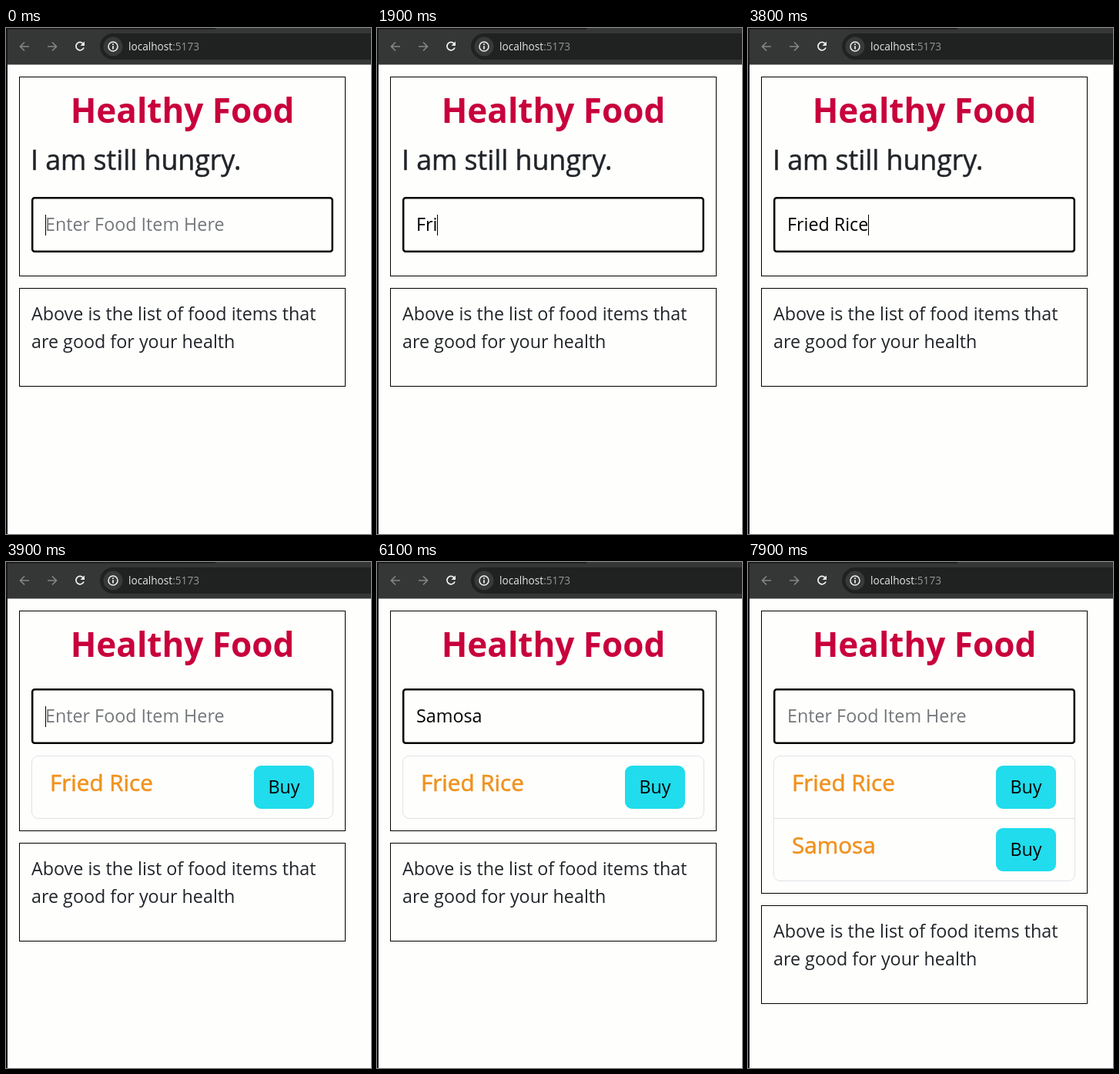
Recreate the animation shown at these times as an HTML page. Size 474x656 px, loop 8000 ms.

```html
<!DOCTYPE html>
<html lang="en">
<head>
<meta charset="utf-8">
<title>Healthy Food</title>
<style>
html, body { margin: 0; width: 100%; height: 100%; overflow: hidden; background: #fefefd; }
svg { display: block; }
text { font: 23.3px "Open Sans", "Noto Sans", sans-serif; fill: #212529; white-space: pre; }
.title { font-size: 44px; font-weight: 700; fill: #c8003c; text-anchor: middle; }
.hungry { font-size: 35.7px; stroke: #212529; stroke-width: .5; }
.item { font-size: 29.6px; fill: #f0921e; stroke: #f0921e; stroke-width: .6; }
.buy { fill: #000; text-anchor: middle; }
.typed { fill: #000; }
.hint { fill: #74777a; }
.url { font-size: 13.65px; fill: #e6e6e6; }
.port { fill: #969696; }
.box { fill: none; stroke: #000; }
.input { fill: none; stroke: #000; stroke-width: 2.5; }
.list { fill: none; stroke: #dfe2e5; }
.icon { fill: none; stroke-width: 1.7; }
</style>
</head>
<body>
<svg width="474" height="656" viewBox="0 0 474 656">
  <rect width="474" height="47.5" fill="#353636"/>
  <rect width="272" height="1.5" fill="#171717"/>
  <rect x="122" y="7" width="400" height="34" rx="17" fill="#202121"/>
  <rect width="2" height="656" fill="#171519"/>
  <g class="icon" stroke="#858585">
    <path d="M30 24H19M24 18.500l-5.500 5.500 5.500 5.500"/>
    <path d="M54 24H65M60 18.500l5.500 5.500-5.500 5.500"/>
  </g>
  <path class="icon" stroke="#f2f2f2" d="M100.300 20.500A5.200 5.200 0 1 0 101 25.500"/>
  <path fill="#f2f2f2" d="M102 17.500v5.500h-5.500z"/>
  <circle cx="139" cy="24" r="12.500" fill="#383939"/>
  <circle class="icon" cx="139" cy="24" r="6" stroke="#f2f2f2" style="stroke-width:1.500"/>
  <path class="icon" stroke="#f2f2f2" d="M139 20.300v1.700M139 23.200v4.300"/>
  <text class="url" x="159" y="29">localhost<tspan class="port">:5173</tspan></text>
  <text class="title" x="229" y="123">Healthy Food</text>
  <g id="page"></g>
</svg>
<script>
const LOOP = 8000, ROW = 81;
const page = document.getElementById('page');

// Each entry: submit time, dish name, time of every keystroke
const dishes = [
  { name: 'Fried Rice', keys: [1100, 1600, 1900, 2000, 2400, 2500, 2800, 2900, 3000, 3200], done: 3900 },
  { name: 'Samosa', keys: [5200, 5300, 5400, 5500, 5600, 5800], done: 6200 }
];
// The caret starts visible and flips at each of these times
const flips = [200, 500, 800, 1100, 1400, 1600, 2300, 2400, 3500, 3800, 4100,
  4400, 4700, 5000, 6000, 6400, 6700, 7000, 7300, 7600, 7900];

const passed = (times, t) => times.filter(at => at <= t).length;
const text = (cls, x, y, str) => `<text class="${cls}" x="${x}" y="${y}">${str}</text>`;
const rect = (cls, x, y, w, h, r = 0) =>
  `<rect class="${cls}" x="${x}" y="${y}" width="${w}" height="${h}" rx="${r}"/>`;

function dishRow(name, i) {
  const y = 251 + i * ROW;
  return (i ? `<path class="list" d="M33.5 ${y + .5}H424.5"/>` : '')
    + text('item', 57, y + 46, name)
    + `<rect x="322" y="${y + 13}" width="78" height="56" rx="9" fill="#20dcec"/>`
    + text('buy', 361, y + 49, 'Buy');
}

function draw(count, typed, caret) {
  const top = count ? 164 : 219;
  const bottom = count ? 267 + count * ROW : 321;
  page.innerHTML =
    rect('box', 17.5, 63.5, 423, bottom - 63)
    + (count ? rect('list', 33.5, 251.5, 391, count * ROW, 8.5)
      : text('hungry', 32, 184, 'I am still hungry.'))
    + rect('input', 34.2, top + 1.2, 389.6, 69.6, 3)
    + text(typed ? 'typed' : 'hint', 51, top + 44, typed || 'Enter Food Item Here')
    + dishes.slice(0, count).map((dish, i) => dishRow(dish.name, i)).join('')
    + rect('box', 17.5, bottom + 16.5, 423, 127)
    + text('', 33, bottom + 58, 'Above is the list of food items that')
    + text('', 33, bottom + 94, 'are good for your health');
  if (caret) {
    const width = typed ? page.querySelector('.typed').getComputedTextLength() : 0;
    page.insertAdjacentHTML('beforeend', rect('caret', Math.round(51 + width), top + 23, 1, 27));
  }
}

let last;
function tick() {
  const t = performance.now() % LOOP;
  const count = passed(dishes.map(dish => dish.done), t);
  const dish = dishes[count];
  const typed = dish ? dish.name.slice(0, passed(dish.keys, t)) : '';
  const caret = passed(flips, t) % 2 === 0;
  const state = [count, typed, caret].join('|');
  if (state !== last) draw(count, typed, caret);
  last = state;
  requestAnimationFrame(tick);
}
tick();
</script>
</body>
</html>
```
